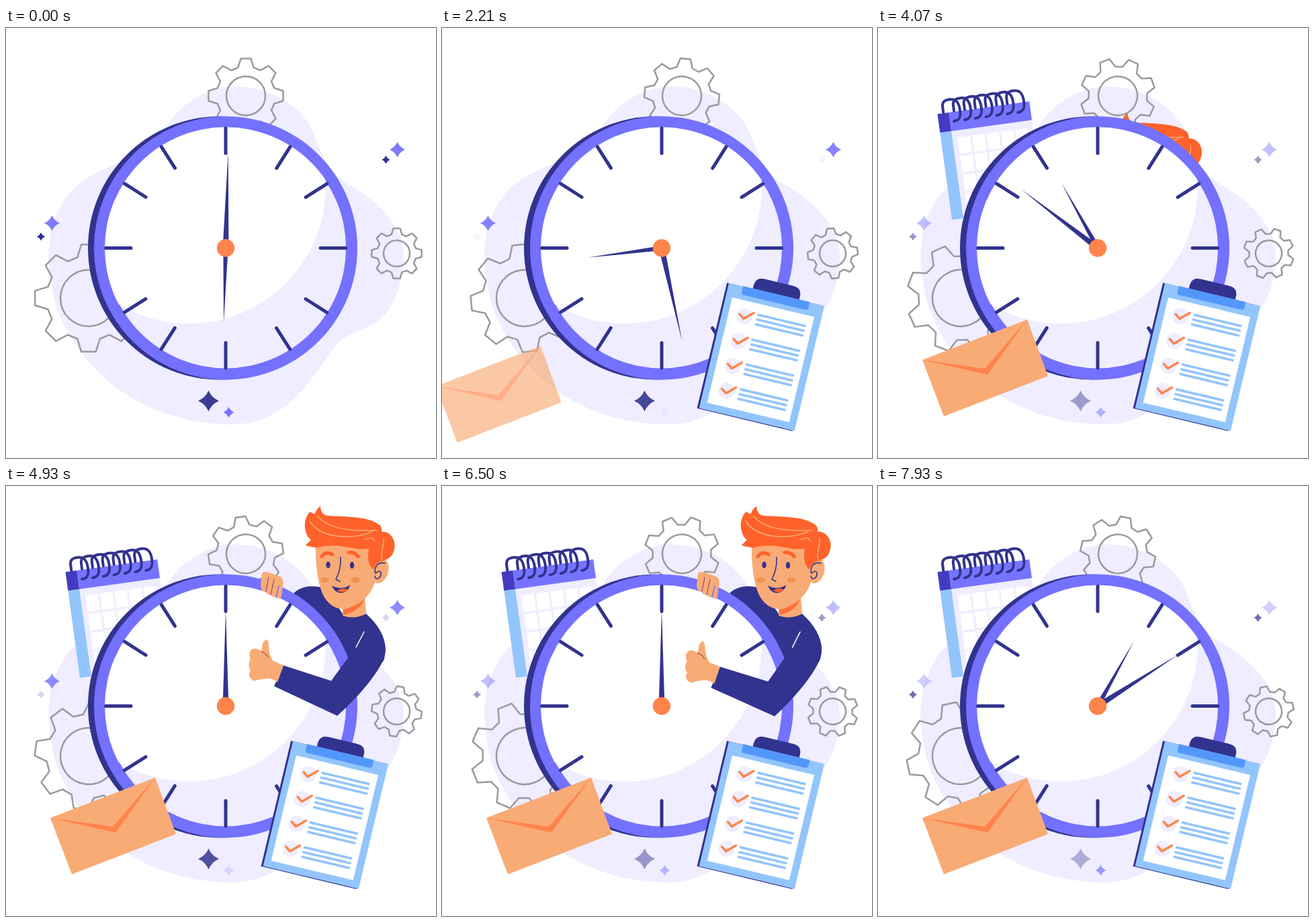
An HTML page that plays this animation: 640x640 px, repeating every 8 s.

```html
<!DOCTYPE html>
<html lang="en">
<head>
<meta charset="utf-8">
<title>Time management</title>
<style>
  html, body { margin: 0; width: 100%; height: 100%; overflow: hidden; background: #fff; }
  svg { display: block; width: 100%; height: 100%; }
  .navy { fill: #32338e; } .violet { fill: #7371fe; } .pale { fill: #efedff; }
  .sky { fill: #92c5fc; } .skin { fill: #f9ab76; } .orange { fill: #ff844b; } .hair { fill: #ff622a; }
  .line { fill: none; stroke: #32338e; stroke-linecap: round; stroke-linejoin: round; }
  .gear { fill: none; stroke: #9a9a9e; stroke-width: 2.5; stroke-linejoin: round; }
</style>
</head>
<body>
<svg viewBox="0 0 640 640">
  <defs><clipPath id="face"><circle cx="327" cy="327.5" r="180"/></clipPath></defs>
  <path class="pale" d="M238 148C260 112 300 87 342 87C400 88 440 120 455 150C468 180 475 210 505 230C545 252 592 290 592 340C590 390 572 430 540 444C515 455 500 458 485 480C455 520 420 590 335 590C200 588 110 510 75 415C55 340 60 290 95 245C120 218 150 210 175 196C210 180 222 172 238 148Z"/>
  <g id="gears"></g>

  <g id="calendar"><g transform="translate(88.5 128) rotate(-7.8)">
    <path class="pale" d="M17 28H138V158H17Z"/>
    <path class="sky" d="M0 28H17V159H0Z"/>
    <path fill="#7673ff" d="M17 0H138V28H17Z"/>
    <path fill="#443bc0" d="M0 0H17V28H0Z"/>
    <g id="cells" fill="#fff"></g>
    <g id="rings" class="line" stroke-width="4"></g>
  </g></g>

  <g id="man">
    <path class="navy" d="M425 164C432 152 450 145 475 152L503 193Q520 198 536 190C560 212 570 235 562 260L500 330L420 260Z"/>
    <path class="skin" d="M501 172V193Q520 199 536 190L533 150Z"/>
    <path class="hair" opacity=".8" d="M502 184Q526 178 534 158V166Q528 186 502 192Z"/>
    <ellipse class="skin" cx="557" cy="126" rx="12" ry="19" transform="rotate(14 557 126)"/>
    <path class="skin" d="M461 84C460 120 465 150 474 166C484 182 500 186 512 181C530 174 545 160 550 140L548 85Q505 60 461 84Z"/>
    <path class="hair" d="M462 92C457 90 451 91 446 88Q450 84 454 80C444 74 440 50 453 38Q456 42 460 41Q462 34 468 30Q468 40 476 44C500 46 540 44 556 58Q560 62 559 68C575 67 582 85 577 97C574 108 566 109 560 112C552 112 550 120 546 124C538 115 538 105 540 93C515 98 500 82 462 92Z"/>
    <path class="line" style="stroke:#f9ab76" stroke-width="1.5" d="M452 52C466 76 510 82 545 68M464 45C476 60 500 68 552 66M534 80Q546 74 548 82M560 110C556 96 564 88 562 78"/>
    <path class="line" style="stroke:#ff622a" stroke-width="5" d="M470 105Q476 96 486 102M510 99Q519 98 524 105"/>
    <ellipse class="navy" cx="479.5" cy="117.5" rx="3.2" ry="5"/>
    <ellipse class="navy" cx="515" cy="118" rx="3.2" ry="5"/>
    <g fill="#f0924f"><ellipse cx="474.5" cy="140" rx="6.5" ry="4"/><ellipse cx="520" cy="140" rx="6.5" ry="4"/></g>
    <path class="line" stroke-width="1.6" d="M498 106C499 122 494 133 491 139L497 142M564 115C553 112 547 122 550 130C558 122 561 132 555 137Q550 140 549 134"/>
    <path class="navy" d="M485 148C492 153 505 153 512 147C511 156 502 160 497 159C490 158 487 153 485 148Z"/>
    <path class="hair" d="M493 156Q500 150 509 154Q503 161 493 156Z"/>
  </g>

  <g id="clock">
    <circle class="navy" cx="318" cy="327.5" r="196"/>
    <circle class="violet" cx="327" cy="327.5" r="196"/>
    <circle class="pale" cx="327" cy="327.5" r="179"/>
    <circle fill="#fff" cx="272" cy="236" r="204" clip-path="url(#face)"/>
    <g id="ticks" class="line" stroke-width="5"></g>
    <path id="hour" class="navy" d="M323.8 315L327 216.5L330.2 315L329 327H325Z"/>
    <path id="minute" class="navy" d="M323 315L327 184.5L331 315L329 327H325Z"/>
    <circle class="orange" cx="327" cy="327.5" r="13.2"/>
  </g>

  <g id="grip">
    <path class="skin" d="M381 130Q384 126 392 129L409 135Q414 140 412 148L410 165Q406 170 402 166Q396 165 394 162Q388 162 387 158Q379 156 379 148Z"/>
    <path class="line" style="stroke:#7a4a60" stroke-width="1.1" d="M387 157L391 136M394 162L399 139"/>
    <path class="line" style="stroke:#7371fe" stroke-width="1.6" d="M402 165L406 149"/>
  </g>
  <g id="arm">
    <path class="navy" d="M533 192C560 212 570 235 562 258C550 285 520 318 493 342L399 298L413 267L484 290L511 253L500 222Z"/>
    <path class="line" style="stroke:#fff" stroke-width="1.5" d="M533 217L521 240"/>
    <path class="skin" d="M404 292C395 284 385 286 370 290C362 288 360 280 364 275C360 270 361 262 364 258C360 250 364 242 370 242Q376 242 380 246C382 240 380 232 388 228C394 235 388 244 397 260L413 267Z"/>
    <path class="line" style="stroke:#7a4a60" stroke-width="1" d="M380 246Q387 249 390 255"/>
  </g>

  <g id="envelope">
    <path class="skin" d="M66 494L222 434L253 518L98 578Z"/>
    <path class="orange" d="M66 494L159 507L222 434L163 516Z"/>
  </g>

  <g id="clipboard"><g transform="translate(427 380) rotate(13.4)">
    <path class="navy" d="M-3 0H143V192H-3Z"/>
    <path class="sky" d="M0 0H146V191H0Z"/>
    <path fill="#fff" d="M9.7 19.3H135.2V180.3H9.7Z"/>
    <path class="navy" d="M36.5 2V-6Q37 -18.500 50 -18.500H94Q107 -18.500 107.500 -6V2Z"/>
    <path fill="#5497fb" d="M21.500 -1H123.500V8Q123.500 12 119.500 12H25.500Q21.500 12 21.500 8Z"/>
    <g id="tasks"></g>
  </g></g>
  <g id="stars"></g>
</svg>
<script>
const LOOP = 8000, RAD = Math.PI / 180;
const $ = id => document.getElementById(id);
const fill = (id, items) => { $(id).innerHTML = items.join(''); };
const range = n => [...Array(n).keys()];
const polar = (r, deg) => `${r * Math.sin(deg * RAD)} ${-r * Math.cos(deg * RAD)}`;

// x, y, outer radius, hole radius, spin direction
const gears = [[357, 101, 56, 29, -1], [123, 402, 80.5, 42, 1], [581.5, 335.5, 37.5, 19.5, 1]];
fill('gears', gears.map(([, , r, hole]) => {
  const points = range(8).flatMap(i => [[-15.5, .78], [-7.7, 1], [7.7, 1], [15.5, .78]]
    .map(([a, k]) => polar(r * k, i * 45 + a)));
  return `<g class="gear"><path d="M${points.join('L')}Z"/><circle r="${hole}"/></g>`;
}));

const tickAngles = range(4).flatMap(q => [0, 32.5, 57.6].map(a => q * 90 + a));
fill('ticks', tickAngles.map(a =>
  `<path d="M${polar(178.5, a)}L${polar(141, a)}" transform="translate(327 327.5)"/>`));

fill('cells', range(20).map(i =>
  `<rect x="${25 + i % 5 * 21.6}" y="${38.7 + (i / 5 | 0) * 28}" width="18.5" height="24.5"/>`));
fill('rings', range(7).map(i =>
  `<path transform="translate(${i * 16})" d="M9 -1V-9C9 -17 13 -19 21 -19C31 -19 34 -12 34 -1C34 8 32 14 23 14"/>`));
fill('tasks', range(4).map(i => `<g transform="translate(33.7 ${42.3 + i * 38})">
  <circle class="pale" r="12"/>
  <path class="line" style="stroke:#ff844b" stroke-width="3.5" d="M-7.5 -1.3L0 4L12.5 -8"/>
  <path class="line" style="stroke:#92c5fc" stroke-width="3.6" d="M20 -6.800H91M20 .5H91M20 7.800H91"/></g>`));

// x, y, radius, color, group
const stars = [[68.5, 290.5, 11.5, '#7673ff', 0], [52, 310.5, 6, '#32338e', 1], [582.5, 181, 11.5, '#7673ff', 0],
  [565.5, 196, 6, '#32338e', 1], [301.5, 555, 15.5, '#32338e', 0], [331.5, 572, 8, '#7673ff', 1]];
fill('stars', stars.map(([x, y, r, color]) =>
  `<path fill="${color}" transform="translate(${x} ${y}) scale(${r})" d="M0 -1Q.3 -.3 1 0Q.3 .3 0 1Q-.3 .3 -1 0Q-.3 -.3 0 -1Z"/>`));

const clamp = x => Math.min(1, Math.max(0, x));
const ease = x => { x = clamp(x); return x * x * (3 - 2 * x); };
// 1 at multiples of the period, 0 halfway between
const triangle = t => Math.abs(1 - 2 * (t / 2400 % 1));

function slide(id, shown, dx, dy, opacity = shown, extra = '') {
  const rest = 1 - shown;
  $(id).setAttribute('transform', `translate(${dx * rest} ${dy * rest}) ${extra}`);
  $(id).setAttribute('opacity', opacity);
}
const turn = (id, deg) => $(id).setAttribute('transform', `rotate(${deg} 327 327.5)`);

function draw(t) {
  gears.forEach(([x, y, , , dir], i) => $('gears').children[i]
    .setAttribute('transform', `translate(${x} ${y}) rotate(${dir * t * .0382})`));

  turn('minute', t < 6000 ? Math.min(360, 1.4 + t * .0752) : Math.max(0, (t - 7165) * .075));
  turn('hour', t < 6000 ? Math.min(360, 181.5 + t * .0367) : Math.max(0, (t - 7150) * .0374));

  slide('clipboard', ease((t - 870) / 800), 190, 100);
  slide('envelope', ease((t - 1730) / 800), -215, 112);
  slide('calendar', ease((t - 2590) / 800), -190, -85);

  const man = ease((t - 3850) / 850) * (1 - ease((t - 7000) / 700));
  const front = ease((man - .6) / .4);
  const sway = -.45 * (1 - Math.cos((t - 4930) / 1050 * 2 * Math.PI));
  slide('man', man, -116, 116, t > 500 ? 1 : 0);
  slide('grip', man, -30, 30, front);
  slide('arm', man, -116, 116, front, `rotate(${sway} 545 215)`);

  stars.forEach(([, , , , group], i) => {
    const late = t < 1140 ? 1 : 1 - triangle(t + 120);
    $('stars').children[i].setAttribute('opacity', group ? late : triangle(t + 60));
  });
}

const start = performance.now();
function frame() {
  draw((performance.now() - start) % LOOP);
  requestAnimationFrame(frame);
}
frame();
</script>
</body>
</html>
```
